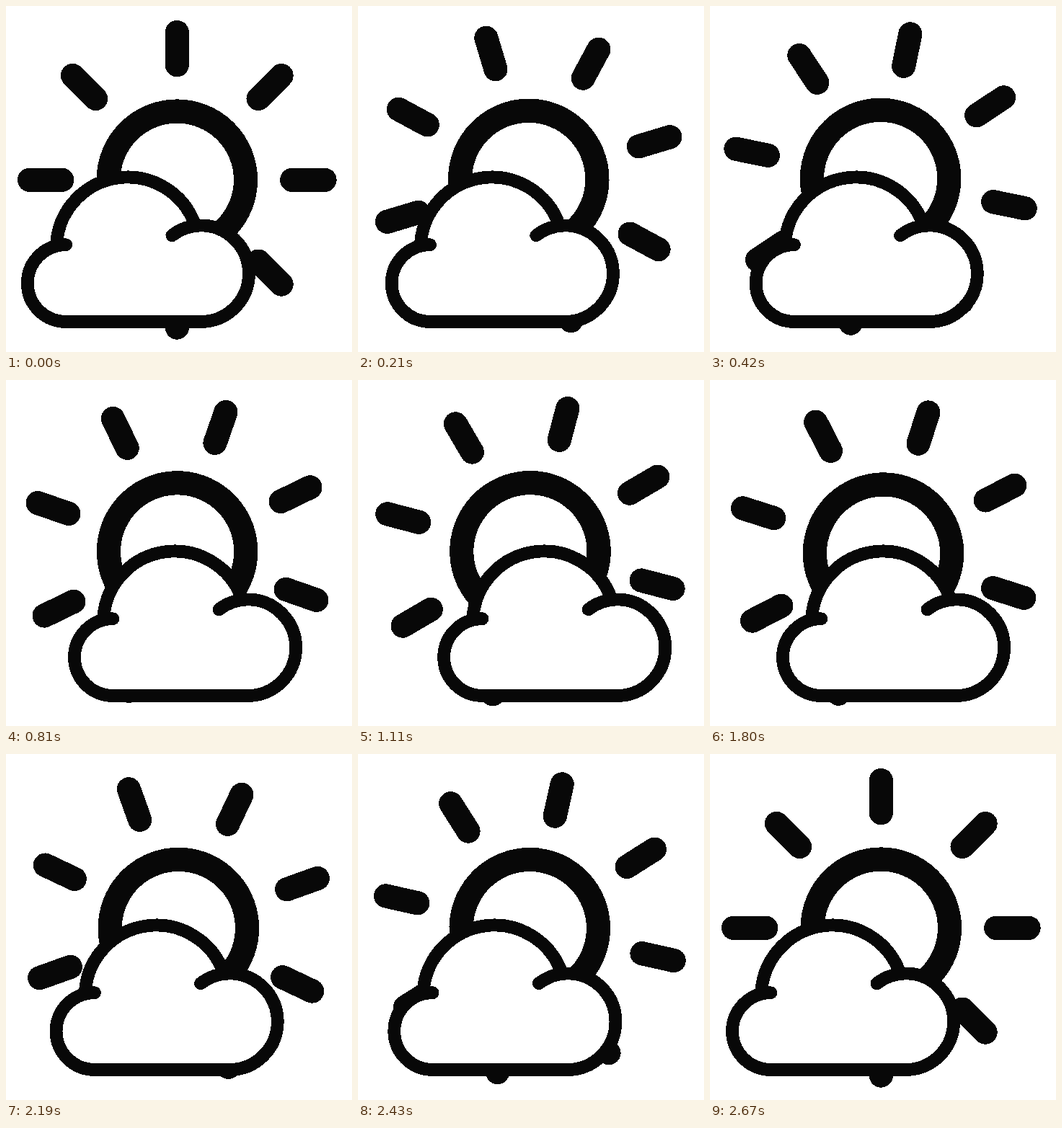
Recreate the animation shown at these times as an HTML page. Size 480 px wide and 480 px high, loop 2.7 s.

```html
<!DOCTYPE html>
<html lang="en">
<head>
<meta charset="utf-8">
<title>Sun and cloud</title>
<style>
  html, body { margin: 0; width: 100%; height: 100%; overflow: hidden; background: #fff; }
  svg { display: block; width: 100%; height: 100%; }
  .ink { stroke: #080808; fill: none; stroke-linecap: round; }
  #sun { stroke-width: 33.2; }
  #cloud .ink { stroke-width: 17.8; }
</style>
</head>
<body>
<svg viewBox="0 0 480 480" shape-rendering="crispEdges">
  <g id="sun" class="ink">
    <circle cx="237.3" cy="241.2" r="95.2"/>
  </g>
  <g id="cloud">
    <path fill="#fff" d="M70.2 331A99 99 0 0 1 262 303A67 67 0 1 1 270 438H83A53.4 53.4 0 0 1 83 331.2Z"/>
    <path class="ink" d="M70.2 328A99 99 0 0 1 262 303"/>
    <path class="ink" d="M230.3 318.3A66.8 66.8 0 0 1 270.2 304.4A66.8 66.8 0 0 1 270.2 438H83.2A53.4 53.4 0 0 1 83.2 331.2"/>
    <path fill="#080808" d="M168 228h3v2h-3z"/>
  </g>
</svg>
<script>
  const LOOP = 2700, STEP = 30;
  const TURN = 2670;            // one full turn of the sun
  const HALF = 1342, DRIFT = 108; // cloud: time and distance to its far side
  const sun = document.getElementById('sun');
  const cloud = document.getElementById('cloud');

  for (let a = 0; a < 360; a += 45) {
    const ray = document.createElementNS(sun.namespaceURI, 'path');
    ray.setAttribute('d', 'M0 -159.5V-204.8');
    ray.setAttribute('transform', `translate(237.3 241.3) rotate(${a})`);
    sun.append(ray);
  }

  function draw(ms) {
    const t = Math.floor((ms % LOOP) / STEP) * STEP;
    const x = DRIFT * Math.max(0, 1 - Math.abs(t - HALF) / HALF);
    // The pivot sits slightly off the sun's centre, which gives the wobble.
    sun.setAttribute('transform', `rotate(${360 * t / TURN} 238.6 239.7)`);
    cloud.setAttribute('transform', `translate(${x} 0)`);
  }

  const start = performance.now();
  function tick() {
    draw(performance.now() - start);
    requestAnimationFrame(tick);
  }
  tick();
</script>
</body>
</html>
```
